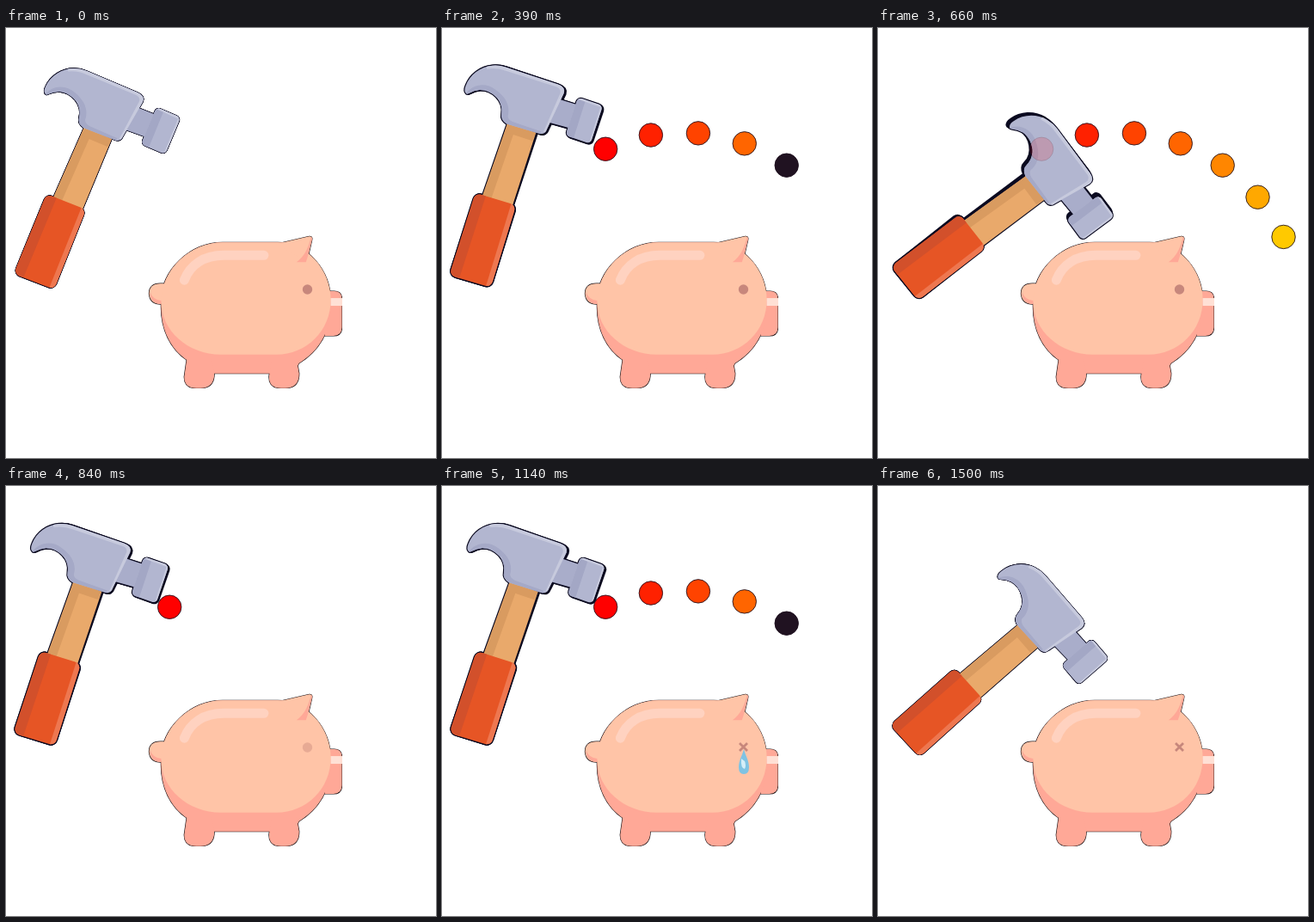
An HTML page with a canvas for the animation above (1.59 s loop, 500 by 500 pixels).

```html
<!DOCTYPE html>
<html lang="en">
<head>
<meta charset="utf-8">
<title>Hammer and piggy bank</title>
<style>
html, body { margin: 0; overflow: hidden; background: #fff; }
canvas { display: block; }
</style>
</head>
<body>
<canvas id="stage" width="500" height="500"></canvas>
<script>
const ctx = document.getElementById('stage').getContext('2d');
const LOOP = 1590, STEP = 30, CYCLE = 750, END = 1500;
const INK = '#0b0a20', PINK = '#ffa897', PEACH = '#ffc4a7';
const PIVOT = [28, 293], PIG_CENTER = [279, 331];
const rad = deg => deg * Math.PI / 180;
const clamp = v => Math.max(0, Math.min(1, v));
const ramp = (t, from, to) => clamp((t - from) / (to - from));

// Hammer swing: time in ms, degrees from the resting pose
const SWING = [
  [0, 0], [60, -3.5], [120, -5], [210, 5.8], [285, 14], [360, -3], [390, -4.7],
  [420, -5], [540, 14], [600, 24], [660, 30.5], [705, 32], [750, 26.2],
  [810, -2], [840, -4], [870, -5], [960, 5.8], [1035, 14], [1110, -3],
  [1140, -3.9], [1170, -5], [1290, 14], [1350, 24], [1410, 30.5], [1455, 32], [1500, 26.2]
];

function slope(i) {
  const a = SWING[Math.max(0, i - 1)], b = SWING[Math.min(SWING.length - 1, i + 1)];
  return (b[1] - a[1]) / (b[0] - a[0]);
}

function swing(t) {
  if (t >= END) return SWING[SWING.length - 1][1];
  const i = SWING.findIndex(k => k[0] > t) - 1;
  const [t0, a] = SWING[i], [t1, b] = SWING[i + 1];
  const d = t1 - t0, u = (t - t0) / d, w = 1 - u;
  return a * (1 + 2 * u) * w * w + b * u * u * (3 - 2 * u)
    + d * u * w * (slope(i) * w - slope(i + 1) * u);
}

function rounded(points, r) {
  const p = new Path2D(), n = points.length;
  const [a, b] = [points[0], points[n - 1]];
  p.moveTo((a[0] + b[0]) / 2, (a[1] + b[1]) / 2);
  points.forEach((q, i) => p.arcTo(...q, ...points[(i + 1) % n], r));
  p.closePath();
  return p;
}

function fill(color, ...paths) {
  ctx.fillStyle = color;
  paths.forEach(p => ctx.fill(p));
}

function outline(color, width, ...paths) {
  ctx.strokeStyle = color;
  ctx.lineWidth = width;
  paths.forEach(p => ctx.stroke(p));
}

function within(shape, draw) {
  ctx.save();
  ctx.clip(shape);
  draw();
  ctx.restore();
}

// Draws turned and scaled about a fixed point
function about([x, y], angle, scale, draw) {
  ctx.save();
  ctx.translate(x, y);
  ctx.rotate(rad(angle));
  ctx.scale(scale, scale);
  ctx.translate(-x, -y);
  draw();
  ctx.restore();
}

const path = d => new Path2D(d);

const head = path('M46 77Q43 74 46 68C52 55 65 47 79 47Q87 47 94 50L153 75Q162 79 159 86L136 126Q133 133 126 130L90 116Q83 111 85 104C89 89 76 75 62 74Q55 74 49 77Q47 78 46 77Z');
const neck = path('M152 92L172 100L163 127L138 118Z');
const face = rounded([[175, 92], [203, 104], [185, 147], [157, 135]], 5);
const wood = path('M91 115L123 129L89 211L55 197Z');
const grip = rounded([[47, 193], [93, 211], [56, 304], [9, 286]], 7);
const hammerParts = [wood, grip, neck, head, face];

const body = path('M252 249H316C350 249 378 281 378 318V324C378 353 364 376 341 390L334 402H214L211 387C190 373 180 350 180 324V318C180 281 214 249 252 249Z');
const belly = path('M252 249H316C350 249 378 281 378 316C378 352 350 380 314 380H250C211 380 180 352 180 318C180 281 214 249 252 249Z');
const ear = path('M314 251L353 242Q357 242 356 246L350 272Z');
const innerEar = path('M338 272Q350 264 355 243Q357 243 356 246L351 266L349 272Z');
const tail = path('M187 297H179Q166 297 166 309Q167 321 180 321Z');
const tailShade = path('M167 307Q167 321 180 321V317Q170 316 167 307Z');
const snout = path('M376 306H382Q391 306 391 315V348Q391 358 381 358H371Z');
const leg = x => path(`M${x + 3} 385H${x + 32}L${x + 35} 402Q${x + 35} 419 ${x + 19} 419H${x + 14}Q${x} 419 ${x} 406Z`);
const legs = [leg(207), leg(306)];
const shine = path('M207 293C214 275 230 264 253 264H300');
const pigFrame = path('M150 230H391V419H150Z');
const tear = path('M351 306C349 314 345 319 345 327Q345 335 351 335Q357 335 357 327C357 319 353 314 351 306Z');
const tearGlint = path('M348 317Q347 328 352 329Q354 325 352 320Z');

function drawBody() {
  outline('#181013', 1.3, tail, snout, ear, body, ...legs);
  fill(PINK, snout, body, ...legs);
  fill(PEACH, tail, belly, ear);
  fill(PINK, tailShade, innerEar);
  ctx.fillStyle = '#ffe0d5';
  ctx.fillRect(378, 314, 14, 9);
  ctx.lineCap = 'round';
  outline('#ffd2c0', 11, shine);
}

function drawFace(t) {
  ctx.globalAlpha = 1 - ramp(t, 780, 885);
  const eye = new Path2D();
  eye.arc(350.5, 304, 5.7, 0, 7);
  fill('#c7877c', eye);
  ctx.globalAlpha = ramp(t, 840, 960);
  ctx.lineCap = 'butt';
  outline('#c7877c', 2.8, path('M346 299L355 308M355 299L346 308'));

  ctx.globalAlpha = 1 - ramp(t, 1260, 1380);
  const size = ramp(t, 960, 1110);
  if (size) {
    about([351, 306], 0, size, () => {
      fill('#7fc3e3', tear);
      fill('#d5eef8', tearGlint);
    });
  }
  ctx.globalAlpha = 1;
}

function drawBalls(t, alpha) {
  const phase = t % CYCLE;
  if (phase >= 720) return;
  ctx.globalAlpha = alpha;
  for (let i = 0; i < 7; i++) {
    const age = phase - 30 - 90 * i;
    if (age < 0) break;
    const a = rad(-24.5 + 14.82 * i), ball = new Path2D();
    ball.arc(278.8 + 213.7 * Math.sin(a), 335.2 - 213.7 * Math.cos(a), 13.7, 0, 7);
    fill(age < STEP ? '#201221' : `rgb(255,${Math.round(33.5 * i)},0)`, ball);
    outline('#201221', 0.9, ball);
  }
  ctx.globalAlpha = 1;
}

function drawHammer(t) {
  const angle = swing(t), moving = t > 0 && t < END;
  const speed = moving ? swing(t + 15) - swing(t - 15) : 0;
  ctx.lineJoin = 'round';
  for (const lag of [0.45, 0.22, 0]) {
    about(PIVOT, angle - lag * speed, 1, () => {
      outline(INK, moving ? 2.4 : 1.3, ...hammerParts);
      fill(INK, ...hammerParts);
    });
  }
  about(PIVOT, angle, 1, () => {
    fill('#e9a96b', wood);
    within(wood, () => {
      fill('#d99b60', path('M91 115L101 119L65 201L55 197Z'), path('M91 115L123 129L118 138L87 125Z'));
    });
    fill('#e65525', grip);
    within(grip, () => {
      fill('#d2502b', path('M47 192L59 197L20 291L8 286Z'));
      fill('#ee7750', path('M88 208L94 211L56 305L50 303Z'));
    });
    fill('#a9adca', neck);
    fill('#b2b6d0', head, face);
    within(head, () => {
      fill('#a5a9c7', path('M45 78C54 66 70 66 80 75C92 85 96 96 92 107Q92 111 97 114L129 128V134H80L84 86L62 74Z'));
      outline('#c7cadd', 5, path('M72 48Q85 47 95 52L153 76Q160 80 157 87L134 130'));
    });
    within(face, () => {
      fill('#a3a7c5', path('M175 91L184 95L166 139L156 135Z'));
      outline('#c7cadd', 6, path('M175 91L204 104L186 148'));
    });
  });
}

function render(now) {
  const t = Math.min(END, Math.floor(now % LOOP / STEP) * STEP);
  ctx.fillStyle = '#fff';
  ctx.fillRect(0, 0, 500, 500);
  within(pigFrame, () => about(PIG_CENTER, 0, 0.996, drawBody));
  drawFace(t);
  drawBalls(t, 1);
  drawHammer(t);
  drawBalls(t, 0.15); // balls shimmer faintly through the hammer
}

const start = performance.now();
function tick() {
  render(performance.now() - start);
  requestAnimationFrame(tick);
}
tick();
</script>
</body>
</html>
```
